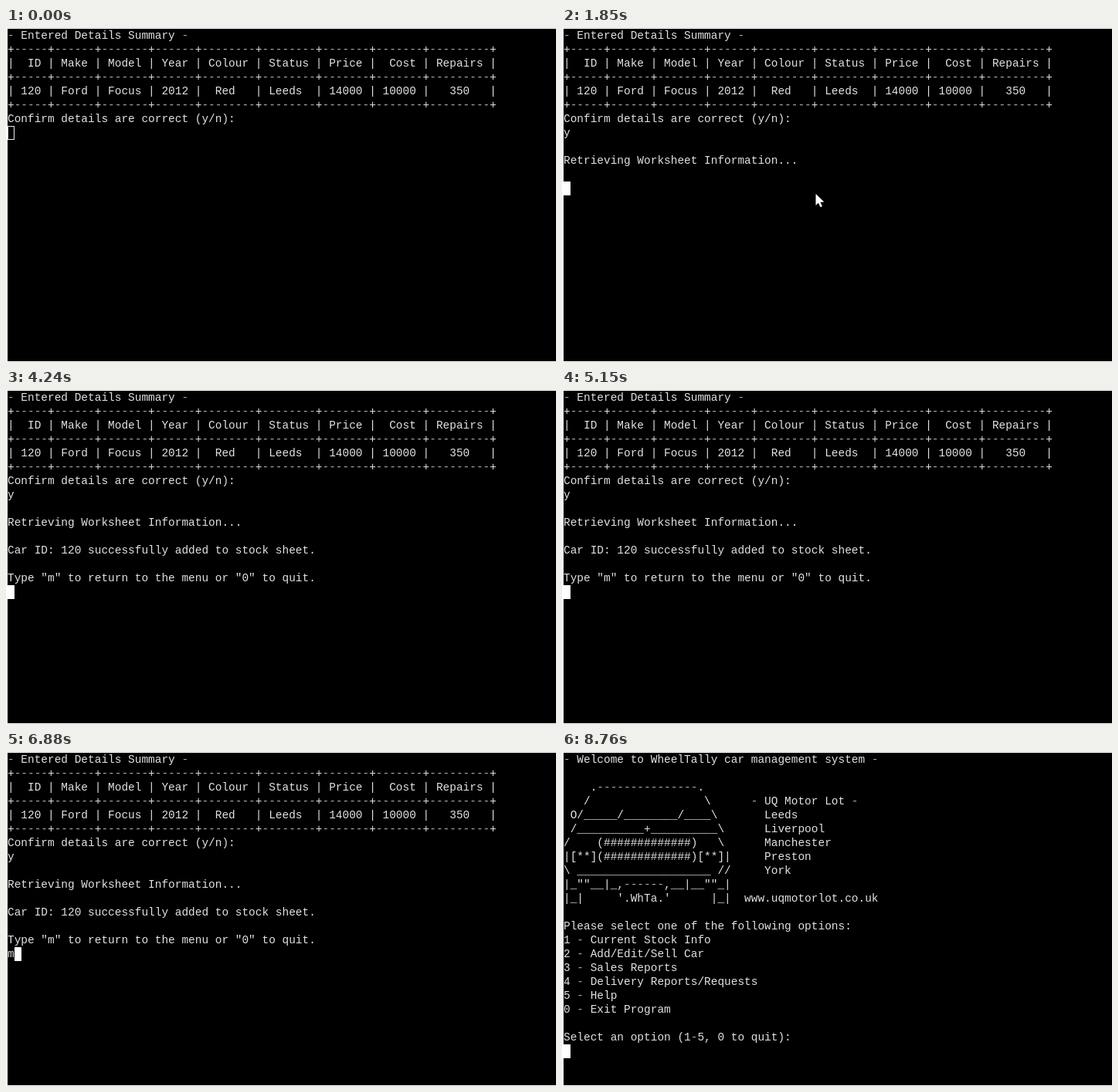
These frames come from a looping animation (712x433 px, 8860 ms). An HTML page with a canvas:

```html
<!DOCTYPE html>
<html lang="en">
<head>
<meta charset="utf-8">
<title>Terminal session</title>
<style>
html, body { margin: 0; width: 100%; height: 100%; overflow: hidden; background: #fff; }
canvas { display: block; }
</style>
</head>
<body>
<canvas id="stage" width="712" height="433"></canvas>
<script>
const ctx = document.getElementById('stage').getContext('2d');
const LOOP = 8860;
const LEFT = 2, TOP = 1, CELL = 8.67, ROW = 18, BASE = 13;
const FONT = '14.45px "Liberation Mono", "Courier New", monospace';

// Times of the events in one loop, in ms
const AT = { pointerIn: 200, focus: 650, typeY: 1130, enterY: 1480, pointerOut: 2330,
  added: 3630, typeM: 6480, menu: 7210 };

const rule = '+' + [5, 6, 7, 6, 8, 8, 7, 7, 9].map(n => '-'.repeat(n)).join('+') + '+';

const summary = [
  '- Entered Details Summary -',
  rule,
  '|  ID | Make | Model | Year | Colour | Status | Price |  Cost | Repairs |',
  rule,
  '| 120 | Ford | Focus | 2012 |  Red   | Leeds  | 14000 | 10000 |   350   |',
  rule,
  'Confirm details are correct (y/n):'
];

const retrieving = ['y', '', 'Retrieving Worksheet Information...', ''];

const added = [
  'Car ID: 120 successfully added to stock sheet.',
  '',
  'Type "m" to return to the menu or "0" to quit.'
];

const menu = String.raw`- Welcome to WheelTally car management system -

    .---------------.
   /                 \      - UQ Motor Lot -
 O/_____/________/____\       Leeds
 /__________+__________\      Liverpool
/    (#############)   \      Manchester
|[**](#############)[**]|     Preston
\ ____________________ //     York
|_""__|_,------,__|__""_|
|_|     '.WhTa.'      |_|  www.uqmotorlot.co.uk

Please select one of the following options:
1 - Current Stock Info
2 - Add/Edit/Sell Car
3 - Sales Reports
4 - Delivery Reports/Requests
5 - Help
0 - Exit Program

Select an option (1-5, 0 to quit):`.split('\n');

// The last line is the one holding the cursor
function linesAt(t) {
  if (t >= AT.menu) return [...menu, ''];
  if (t >= AT.added) return [...summary, ...retrieving, ...added, t >= AT.typeM ? 'm' : ''];
  if (t >= AT.enterY) return [...summary, ...retrieving, ''];
  return [...summary, t >= AT.typeY ? 'y' : ''];
}

function drawText(lines) {
  ctx.font = FONT;
  ctx.textBaseline = 'alphabetic';
  lines.forEach((line, row) => {
    [...line].forEach((ch, col) => {
      if (ch === ' ') return;
      ctx.fillStyle = ch === '-' ? '#a8a8a8' : '#e2e2e2';
      ctx.fillText(ch, LEFT + col * CELL, TOP + row * ROW + BASE);
    });
  });
}

function drawCursor(lines, focused) {
  const row = lines.length - 1;
  const x = Math.round(LEFT + lines[row].length * CELL);
  const y = TOP + row * ROW;
  if (focused) {
    ctx.fillStyle = '#fff';
    ctx.fillRect(x, y, 9, ROW);
  } else {
    ctx.strokeStyle = '#e8e8e8';
    ctx.lineWidth = 1;
    ctx.strokeRect(x + 0.5, y + 0.5, 8, ROW - 1);
  }
}

function drawPointer(t) {
  if (t < AT.pointerIn || t >= AT.pointerOut) return;
  const rest = (1 - Math.min(1, (t - AT.pointerIn) / 350)) ** 3;
  const x = 328.5 + 22 * rest, y = 215 + 5 * rest;
  ctx.beginPath();
  for (const [dx, dy] of [[0, 0], [0, 15], [3.4, 11.8], [6, 17.3], [8.4, 16.2], [6, 10.8], [10.8, 10.6]]) {
    ctx.lineTo(x + dx, y + dy);
  }
  ctx.closePath();
  ctx.fillStyle = '#fff';
  ctx.fill();
}

function draw(t) {
  ctx.fillStyle = '#fff';
  ctx.fillRect(0, 0, 712, 433);
  ctx.fillStyle = '#000';
  ctx.fillRect(LEFT, TOP, 710, 431);
  const lines = linesAt(t);
  drawText(lines);
  drawCursor(lines, t >= AT.focus);
  drawPointer(t);
}

const start = performance.now();
function tick() {
  draw((performance.now() - start) % LOOP);
  requestAnimationFrame(tick);
}
tick();
</script>
</body>
</html>
```
